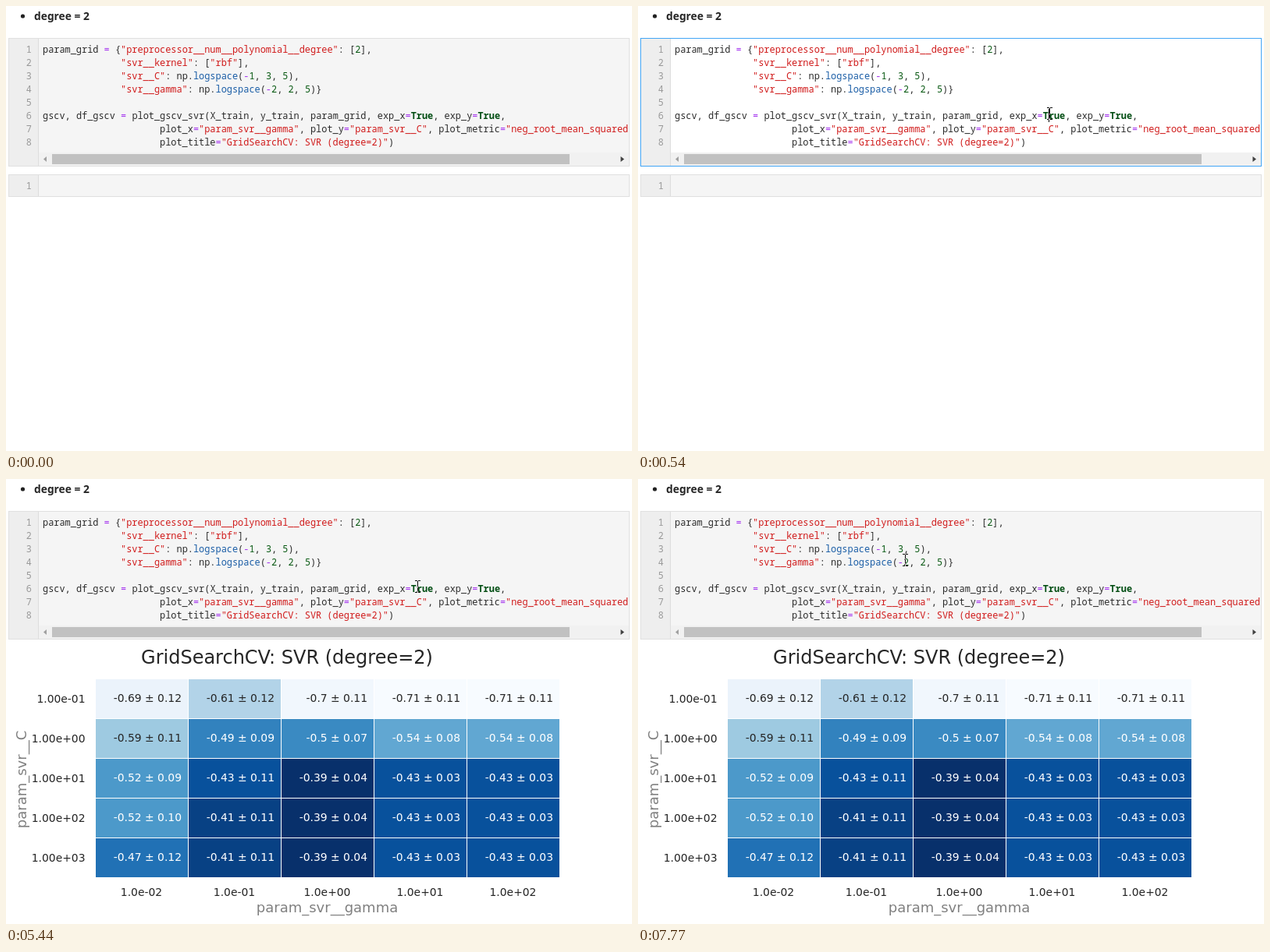
Write an HTML page that moves like this. It is 802 by 571 pixels and loops after 8 s.

```html
<!DOCTYPE html>
<html lang="en">
<head>
<meta charset="utf-8">
<style>
  html, body { margin: 0; width: 100%; height: 100%; overflow: hidden; background: #fff; }
  svg { display: block; }
  text { white-space: pre; fill: #262626; font-family: "DejaVu Sans", sans-serif; }
  .code text { font: 11.915px "Noto Sans Mono", monospace; fill: #2b2b2b; }
  .code .num { fill: #999; text-anchor: end; }
  .str { fill: #d01b1b; }
  .kw { fill: #004d12; font-weight: bold; }
  .fn { fill: #1a5da6; }
  .int { fill: #0a5a14; }
  .op { fill: #a22fee; }
  .tick { font-size: 13.89px; }
  .axis { font-size: 18px; fill: #808080; text-anchor: middle; }
  .mid { text-anchor: middle; }
  .end { text-anchor: end; }
  .box { fill: #f5f5f5; stroke: #e0e0e0; }
  .focus .box { fill: #fff; stroke: #42a5f5; }
  #beam { mix-blend-mode: difference; fill: #fff; }
</style>
</head>
<body>
<svg width="802" height="571" viewBox="0 0 802 571">
  <rect width="802" height="571" fill="#fff"/>
  <circle cx="21.5" cy="13" r="2.6" fill="#222"/>
  <text x="36" y="18" style="font:bold 13.8px 'Noto Sans',sans-serif">degree = 2</text>
  <g class="code" id="input"></g>
  <g id="bar">
    <rect x="42" y="188" width="756" height="17" fill="#f1f1f1"/>
    <rect id="thumb" x="59" y="190" width="663" height="13"/>
    <path d="M52 193v7l-4-3.5z" fill="#a0a0a0"/>
    <path d="M787.5 193v7l4.5-3.5z" fill="#404040"/>
  </g>
  <rect id="caret" x="526" y="132" width="1" height="17"/>
  <g class="code" id="next"></g>
  <g id="plot"></g>
  <path id="arrow" d="M.5 .5v15.5l3.6-3.4 2.4 5.6 2.2-1-2.4-5.4h5z" fill="#fff" stroke="#000"/>
  <path id="beam" d="M0 0h3v1H0zM4 0h3v1H4zM3 1h1v14H3zM0 15h3v1H0zM4 15h3v1H4z"/>
</svg>
<script>
const $ = id => document.getElementById(id);

function add(parent, tag, attrs, text = '') {
  const el = document.createElementNS('http://www.w3.org/2000/svg', tag);
  for (const key in attrs) el.setAttribute(key, attrs[key]);
  el.textContent = text;
  return parent.appendChild(el);
}

const pad = n => ' '.repeat(n);
const code = [
  'param_grid = {"preprocessor__num__polynomial__degree": [2],',
  pad(14) + '"svr__kernel": ["rbf"],',
  pad(14) + '"svr__C": np.logspace(-1, 3, 5),',
  pad(14) + '"svr__gamma": np.logspace(-2, 2, 5)}',
  '',
  'gscv, df_gscv = plot_gscv_svr(X_train, y_train, param_grid, exp_x=True, exp_y=True,',
  pad(21) + 'plot_x="param_svr__gamma", plot_y="param_svr__C", plot_metric="neg_root_mean_squared',
  pad(21) + 'plot_title="GridSearchCV: SVR (degree=2)")'
];

function tokenClass(s) {
  if (s[0] === '"') return 'str';
  if (s === 'True') return 'kw';
  if (s === 'logspace') return 'fn';
  if (/^\d/.test(s)) return 'int';
  return /^[=-]$/.test(s) ? 'op' : '';
}

function cell(group, top, height, lines) {
  add(group, 'rect', {x: 3.5, y: top + .5, width: 795, height: height - 1, class: 'box'});
  add(group, 'rect', {x: 4, y: top + 1, width: 37, height: height - 2, fill: '#eee'});
  add(group, 'rect', {x: 41, y: top + 1, width: 1, height: height - 2, fill: '#ddd'});
  lines.forEach((line, i) => {
    const y = top + 19 + 17 * i;
    add(group, 'text', {x: 33, y, class: 'num'}, i + 1);
    const row = add(group, 'text', {x: 47, y});
    for (const s of line.match(/"[^"]*"?|\w+|\s+|./g) || [])
      add(row, 'tspan', {class: tokenClass(s)}, s);
  });
}

cell($('input'), 41, 165, code);
cell($('next'), 216, 29, ['']);

// Blue scale from light (worst score) to dark (best)
const blues = ['f7fbff', 'deebf7', 'c6dbef', '9ecae1', '6baed6', '4292c6', '2171b5', '08519c', '08306b'];
const channel = (hex, k) => parseInt(hex.substr(2 * k, 2), 16);

function shade(score) {
  const pos = (score + .71) / .32 * 8;
  const i = Math.max(0, Math.min(7, Math.floor(pos)));
  const mix = [0, 1, 2].map(k => {
    const a = channel(blues[i], k);
    return Math.round(a + (channel(blues[i + 1], k) - a) * (pos - i));
  });
  return `rgb(${mix})`;
}

// Exponent label such as -01 or +02
const exponent = n => (n < 0 ? '-0' : '+0') + Math.abs(n);

const tail = ', -0.39 ± 0.04' + ', -0.43 ± 0.03'.repeat(2);
const rows = [
  '-0.69 ± 0.12, -0.61 ± 0.12, -0.7 ± 0.11' + ', -0.71 ± 0.11'.repeat(2),
  '-0.59 ± 0.11, -0.49 ± 0.09, -0.5 ± 0.07' + ', -0.54 ± 0.08'.repeat(2),
  '-0.52 ± 0.09, -0.43 ± 0.11' + tail,
  '-0.52 ± 0.10, -0.41 ± 0.11' + tail,
  '-0.47 ± 0.12, -0.41 ± 0.11' + tail
];
const plot = $('plot');
add(plot, 'text', {x: 360, y: 237, class: 'mid', 'font-size': 24}, 'GridSearchCV: SVR (degree=2)');
rows.forEach((row, j) => {
  const top = 257 + 51 * j;
  add(plot, 'text', {x: 101.5, y: top + 30, class: 'tick end'}, '1.00e' + exponent(j - 1));
  add(plot, 'text', {x: 173.5 + 119 * j, y: 535, class: 'tick mid'}, '1.0e' + exponent(j - 2));
  row.split(', ').forEach((label, i) => {
    const score = parseFloat(label);
    const x = 115 + 119 * i;
    add(plot, 'rect', {x, y: top, width: 118, height: 50, fill: shade(score)});
    const fill = score < -.55 ? '#262626' : '#fff';
    add(plot, 'text', {x: x + 110, y: top + 29, class: 'tick end', style: 'fill:' + fill}, label);
  });
});
add(plot, 'text', {x: 411.5, y: 556, class: 'axis'}, 'param_svr__gamma');
add(plot, 'text', {transform: 'translate(26 385.5) rotate(-90)', class: 'axis'}, 'param_svr__C');

// Pointer key points: [ms, x, y]
const keys = [
  [55, 538, 327], [209, 526, 137], [286, 524, 130],
  [6215, 524, 130], [6600, 429, 183], [7062, 230, 107], [7524, 339, 96]
];

function pointer(t) {
  const next = keys.findIndex(k => k[0] > t);
  if (next < 1) return keys[next < 0 ? keys.length - 1 : 0].slice(1);
  const a = keys[next - 1], b = keys[next];
  const ease = Math.sin((t - a[0]) / (b[0] - a[0]) * Math.PI / 2);
  return [1, 2].map(k => Math.round(a[k] + (b[k] - a[k]) * ease));
}

const show = (id, on) => $(id).style.display = on ? '' : 'none';

function draw() {
  const t = performance.now() % 8000;
  // The pointer is sampled every 77 ms
  const tick = 55 + 77 * Math.floor((t - 55) / 77);
  const [x, y] = pointer(tick);
  const isArrow = tick < 209;
  for (const id of ['arrow', 'beam']) $(id).setAttribute('transform', `translate(${x} ${y})`);
  show('arrow', t >= 70 && isArrow);
  show('beam', !isArrow);
  $('thumb').setAttribute('fill', isArrow && y >= 190 && y < 203 ? '#a8a8a8' : '#c1c1c1');
  $('input').classList.toggle('focus', t >= 450 && t < 2030);
  show('caret', t >= 450 && t < 1050);
  show('next', t < 5440);
  show('plot', t >= 5440);
  requestAnimationFrame(draw);
}
draw();
</script>
</body>
</html>
```
